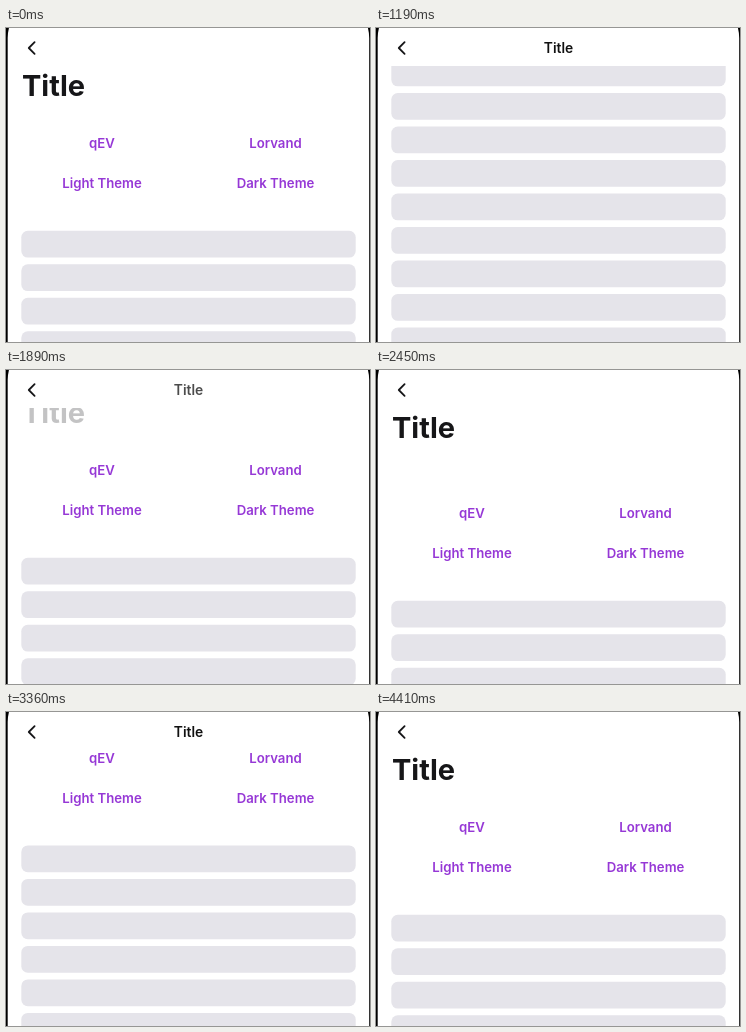
Animation, 364 px wide and 314 px high, one loop 4620 ms. Source, as an HTML page:

```html
<!DOCTYPE html>
<html lang="en">
<head>
<meta charset="utf-8">
<title>Collapsing title</title>
<style>
html, body { margin: 0; width: 100%; height: 100%; overflow: hidden; background: #000; }
svg { display: block; width: 364px; height: 314px; font-family: Inter, "Open Sans", sans-serif; }
.large { font-size: 29px; font-weight: 700; fill: #161618; }
.small { font-size: 13.8px; font-weight: 600; fill: #111; text-anchor: middle; }
.links { font-size: 13.2px; font-weight: 600; fill: #9638d6; text-anchor: middle; }
.bars { fill: #e5e4ea; }
</style>
</head>
<body>
<svg viewBox="0 0 364 314">
  <defs><clipPath id="view"><rect y="38" width="364" height="276"/></clipPath></defs>
  <rect x="1.7" y="-30" width="361.5" height="400" rx="40" fill="#fff"/>
  <path d="M28.6 14.2 22.8 20l5.8 5.8" fill="none" stroke="#161618" stroke-width="1.8" stroke-linecap="round" stroke-linejoin="round"/>
  <text id="small" class="small" x="182.5" y="25">Title</text>
  <g clip-path="url(#view)">
    <text id="large" class="large" x="16" y="68">Title</text>
    <g id="content">
      <g class="links">
        <text x="96" y="120">qEV</text>
        <text x="269.5" y="120">Lorvand</text>
        <text x="96" y="160.3">Light Theme</text>
        <text x="269.5" y="160.3">Dark Theme</text>
      </g>
      <g id="bars" class="bars"></g>
    </g>
  </g>
</svg>
<script>
const LOOP = 4620, STEP = 70, FADE = 20;

// [time in ms, scroll offset in px]
const track = [
  [0, 0], [490, 0], [840, 110], [1190, 171.3], [1330, 171.3],
  [1890, 15], [2170, -34], [2450, -28], [3010, 163.3], [3080, 164],
  [3570, -12], [3740, -32], [3850, -26], [3990, -11], [4130, -3],
  [4410, 0], [LOOP, 0]
];

const $ = id => document.getElementById(id);
const small = $('small'), large = $('large'), content = $('content'), bars = $('bars');

for (let i = 0; i < 14; i++) {
  const bar = document.createElementNS('http://www.w3.org/2000/svg', 'rect');
  const box = { x: 15.3, y: 202.8 + i * 33.5, width: 334.4, height: 26.8, rx: 6.5 };
  for (const key in box) bar.setAttribute(key, box[key]);
  bars.append(bar);
}

const slope = i => (track[i + 1][1] - track[i][1]) / (track[i + 1][0] - track[i][0]);

// Tangents that never overshoot the points
const tangents = track.map((_, i) => {
  if (i === 0 || i === track.length - 1) return 0;
  const a = slope(i - 1), b = slope(i);
  return a * b > 0 ? 2 * a * b / (a + b) : 0;
});

function scrollAt(t) {
  let i = 0;
  while (i < track.length - 2 && t >= track[i + 1][0]) i++;
  const [t0, y0] = track[i], [t1, y1] = track[i + 1];
  const d = t1 - t0, u = (t - t0) / d, v = 1 - u;
  return y0 * (1 + 2 * u) * v * v + tangents[i] * d * u * v * v
    + y1 * u * u * (3 - 2 * u) - tangents[i + 1] * d * u * u * v;
}

function draw() {
  const t = Math.floor(performance.now() % LOOP / STEP) * STEP;
  const y = scrollAt(t), up = Math.max(0, y), fade = Math.min(1, up / FADE);
  content.setAttribute('transform', `translate(0 ${-y})`);
  large.setAttribute('transform', `translate(0 ${-up})`);
  large.setAttribute('opacity', 1 - fade);
  small.setAttribute('opacity', fade);
  requestAnimationFrame(draw);
}
draw();
</script>
</body>
</html>
```
